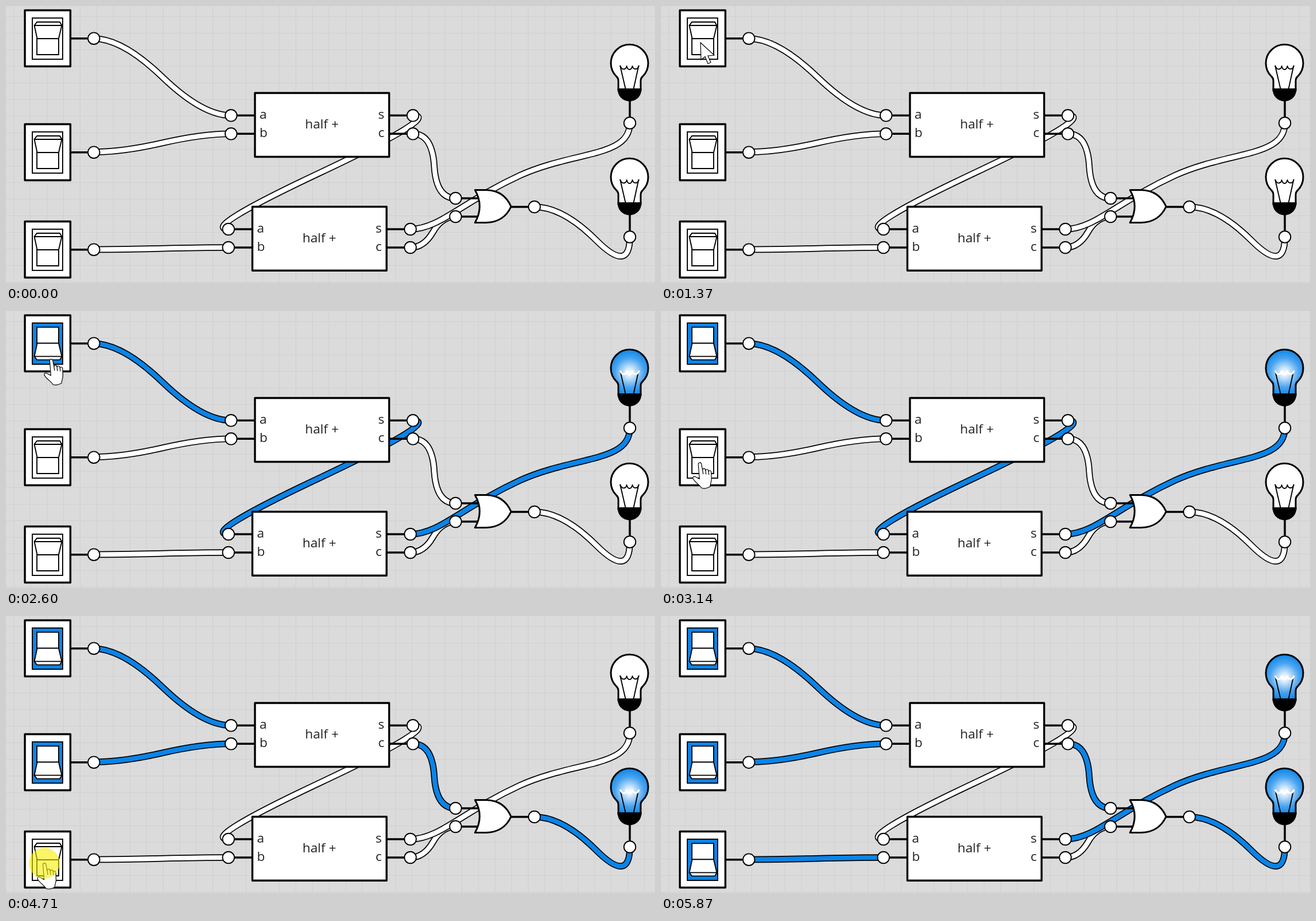
Recreate the animation shown at these times as an HTML page. Size 1134x484 px, loop 6730 ms.

```html
<!DOCTYPE html>
<html lang="en">
<head>
<meta charset="utf-8">
<title>Full adder</title>
<style>
  html, body { margin: 0; width: 100%; height: 100%; overflow: hidden; background: #dbdbdb; }
  svg { display: block; width: 1134px; height: 484px; }
  text { font: 22.7px "Open Sans", "Noto Sans", sans-serif; fill: #222; }
  .part { fill: #fff; stroke: #000; stroke-width: 3.4; stroke-linejoin: round; }
  .thin { fill: #fff; stroke: #000; stroke-width: 1.9; }
  .pin { stroke: #000; stroke-width: 3.5; }
  .wire { fill: none; stroke: #000; stroke-width: 11.6; }
  .core { fill: none; stroke-width: 8.2; }
</style>
</head>
<body>
<svg id="stage" viewBox="0 0 1134 484">
  <defs>
    <pattern id="grid" x="13" y="18" width="29" height="29" patternUnits="userSpaceOnUse">
      <path d="M.5 0V29M0 .5H29" stroke="#d0d0d0"/>
    </pattern>
    <radialGradient id="glow" gradientUnits="userSpaceOnUse" cx="1089.5" cy="108" r="41">
      <stop offset="0" stop-color="#fff"/>
      <stop offset=".2" stop-color="#d3e8fb"/>
      <stop offset=".62" stop-color="#4aa4f0"/>
      <stop offset="1" stop-color="#0a84e8"/>
    </radialGradient>
  </defs>
  <rect width="1134" height="484" fill="#dbdbdb"/>
  <rect width="1134" height="484" fill="url(#grid)"/>
  <g id="wires"></g>
  <g id="parts"></g>
  <g id="arrow">
    <path d="M0 0L1 30L8 24.5L13 37L18 34.5L13 23L24 22Z" fill="#fff" stroke="#000" stroke-width="1.2"/>
  </g>
  <g id="hand" fill="#fff" stroke="#000" stroke-width="1.2" stroke-linejoin="round">
    <path d="M-2.5 2.5C-2.5-1 2.5-1 3 2.5L5 13C5 9.5 9.5 9.5 10 12.5L10.3 14C10.5 11 14.5 11 15 13.5L15.5 15.5C16 13 19.5 13 20 16L20.5 28C20.5 34 18.5 37 18 42C12 45 6 45.5 3 44C1 40-6 36-11 29C-14 25-10 22.5-6 25.5L-.5 28.5Z"/>
    <path d="M5 13L6 20M10.3 14L11 20.5M15.5 15.5L16 21" fill="none"/>
  </g>
  <circle id="click" r="27" fill="#f5ee00" opacity=".6"/>
</svg>
<script>
const BLUE = '#0a84e8', LOOP = 6730;
const $ = id => document.getElementById(id);
const wires = $('wires'), parts = $('parts');

const add = (parent, html) => {
  parent.insertAdjacentHTML('beforeend', html);
  return parent.lastElementChild;
};
const pin = (x1, y1, x2, y2) => `<path class="pin" d="M${x1} ${y1}L${x2} ${y2}"/>`;
const port = (x, y) => `<circle class="thin" cx="${x}" cy="${y}" r="10.3"/>`;
const label = (x, y, anchor, s) => `<text x="${x}" y="${y}" text-anchor="${anchor}">${s}</text>`;

function wire(d) {
  add(wires, `<path class="wire" d="${d}"/>`);
  return add(wires, `<path class="core" d="${d}"/>`);
}
// Two quadratic curves that meet halfway between their control points.
const bend = (x1, y1, cx1, cy1, cx2, cy2, x2, y2) =>
  wire(`M${x1} ${y1}Q${cx1} ${cy1} ${(cx1 + cx2) / 2} ${(cy1 + cy2) / 2}Q${cx2} ${cy2} ${x2} ${y2}`);
// Wire that leaves and arrives horizontally.
function link(x1, y1, x2, y2) {
  const h = Math.min(50, Math.hypot(x2 - x1, y2 - y1) / 4);
  return bend(x1, y1, x1 + h, y1, x2 - h, y2, x2, y2);
}

const net = {
  a: link(153.5, 57, 393, 191.3),
  b: link(153.5, 255.2, 393, 223.3),
  ci: link(153.5, 425.5, 389, 422),
  s1: link(711, 191.3, 389, 390),
  c1: link(711, 223.3, 785.5, 336),
  c2: link(706.5, 422, 785.5, 368),
  s2: wire('M706.5 390C757 390 798 342 898 296C993 253 1090 265 1090 204.5'),
  out: bend(923, 351, 973, 351, 1090, 468, 1090, 403)
};

function makeSwitch(dy) {
  const g = add(parts, `<g transform="translate(0 ${dy})">
    <rect class="part" x="33" y="7.5" width="79.5" height="98"/>
    <rect class="thin well" x="46" y="21" width="53" height="72"/>
    <g class="thin rocker">
      <path d="M54 57H92V85H54Z"/>
      <path d="M54 28H94L97.5 34L92 57H54.5L49.5 34Z M49.5 34H97.5"/>
    </g>
    ${pin(113, 56.7, 153, 56.7)}${port(153.5, 56.7)}</g>`);
  const well = g.querySelector('.well'), rocker = g.querySelector('.rocker');
  return on => {
    well.style.fill = on ? BLUE : '#fff';
    rocker.setAttribute('transform', on ? 'translate(0 113.4) scale(1 -1)' : '');
  };
}

function makeAdder(dx, dy) {
  let s = '<rect class="part" x="435" y="152" width="234.5" height="111.5"/>' + label(552, 214.2, 'middle', 'half +');
  [['a', 's', 191.3], ['b', 'c', 223.3]].forEach(([l, r, y]) => {
    s += pin(393, y, 434, y) + pin(670, y, 711, y) + port(393.2, y) + port(711, y) +
      label(443, y + 5.7, 'start', l) + label(661, y + 5.7, 'end', r);
  });
  add(parts, `<g transform="translate(${dx} ${dy})">${s}</g>`);
}

function makeBulb(dy) {
  const g = add(parts, `<g transform="translate(0 ${dy})">
    ${pin(1090, 160, 1090, 204)}
    <path class="glass" d="M1070 147V131Q1070 126 1066.5 123A32.6 32.6 0 1 1 1112.5 123Q1109 126 1109 131V147Z" stroke="#000" stroke-width="3"/>
    <path d="M1068.5 144H1110.5C1110.5 158 1101 166.5 1089.5 166.5S1068.5 158 1068.5 144Z"/>
    <path d="M1073 104L1082.5 145M1105.5 104L1096.5 145" stroke="#000" stroke-width="1.9"/>
    <path class="coil" d="M1073 104Q1076 112 1081 110Q1084 109 1084.5 105Q1086 111 1089.5 111T1094.5 105Q1096 110 1099 110Q1104 111 1106 104" fill="none" stroke-linejoin="round"/>
    ${port(1090, 204.5)}</g>`);
  const glass = g.querySelector('.glass'), coil = g.querySelector('.coil');
  return on => {
    glass.setAttribute('fill', on ? 'url(#glow)' : '#fff');
    coil.setAttribute('stroke', on ? '#fff' : '#000');
    coil.setAttribute('stroke-width', on ? 3.2 : 1.9);
  };
}

const switches = [0, 199, 369].map(makeSwitch);
makeAdder(0, 0);
makeAdder(-4.5, 198.7);
const bulbs = [0, 199].map(makeBulb);
add(parts, `<g>${pin(786, 336, 826, 336)}${pin(786, 368, 826, 368)}${pin(882, 351, 923, 351)}
  <path class="part" style="stroke-width:3" d="M819.5 321.5H839C861 322 875 333 882.5 350.5C875 367 861 378 839 378.5H819.5C830 360 830 340 819.5 321.5Z"/>
  ${port(785.5, 336)}${port(785.5, 368)}${port(923.3, 351)}</g>`);

// Pointer bursts: start, end, steps, points passed through.
const bursts = [
  [600, 990, 6, [[418, 365], [240, 246], [110, 155], [50, 113]]],
  [1140, 1530, 6, [[50, 113], [45, 88], [69, 64], [72, 37]]],
  [1680, 2310, 9, [[72, 37], [66, 95], [62, 130], [86, 71], [90, 57]]],
  [2600, 3220, 9, [[90, 57], [62, 130], [45, 205], [60, 256], [72, 267]]],
  [3310, 3460, 3, [[72, 267], [78, 266]]],
  [3840, 4480, 9, [[78, 266], [93, 330], [70, 390], [54, 425], [66, 439]]],
  [4570, 4710, 3, [[66, 439], [67, 432]]],
  [4860, 5090, 4, [[67, 432], [67, 432], [150, 405], [350, 335], [524, 275]]],
  [5260, 5870, 9, [[524, 275], [800, 385], [1145, 500]]]
];
const clicks = [[2310, 2450], [3460, 3610], [4710, 4860]];
const toggles = [2370, 3610, 4860];

// Catmull-Rom point at u in 0..1.
function along(pts, u) {
  const n = pts.length - 1, i = Math.min(n - 1, Math.floor(u * n)), f = u * n - i;
  const at = k => pts[Math.max(0, Math.min(n, k))];
  return [0, 1].map(j => {
    const [a, b, c, d] = [-1, 0, 1, 2].map(k => at(i + k)[j]);
    return b + f / 2 * (c - a + f * (2 * a - 5 * b + 4 * c - d + f * (3 * (b - c) + d - a)));
  });
}

function pointer(t) {
  if (t < 600 || t >= 5865) return null;
  const [start, end, steps, pts] = bursts.filter(b => t >= b[0]).pop();
  const k = Math.floor((t - start) / (end - start) * (steps - 1) + 0.1);
  return along(pts, Math.min(1, (k + 1) / steps));
}

const overRocker = ([x, y]) => x > 46 && x < 99 && [21, 220, 390].some(top => y > top && y < top + 72);
const place = (el, p, shown) => {
  el.style.display = shown ? '' : 'none';
  if (shown) el.setAttribute('transform', `translate(${p[0]} ${p[1]})`);
};

function draw(t) {
  const on = toggles.map(at => t >= at);
  const [a, b, ci] = on;
  const s1 = a !== b, c1 = a && b, s2 = s1 !== ci, c2 = s1 && ci, out = c1 || c2;
  const state = { a, b, ci, s1, c1, c2, s2, out };
  for (const key in net) net[key].style.stroke = state[key] ? BLUE : '#fff';
  switches.forEach((set, i) => set(on[i]));
  bulbs[0](s2);
  bulbs[1](out);

  const p = pointer(t), isHand = p && t > 2100 && overRocker(p);
  place($('arrow'), p, p && !isHand);
  place($('hand'), p, isHand);
  place($('click'), p, p && clicks.some(([from, to]) => t >= from && t < to));
}

const t0 = performance.now();
function tick() {
  draw((performance.now() - t0) % LOOP);
  requestAnimationFrame(tick);
}
tick();
</script>
</body>
</html>
```
